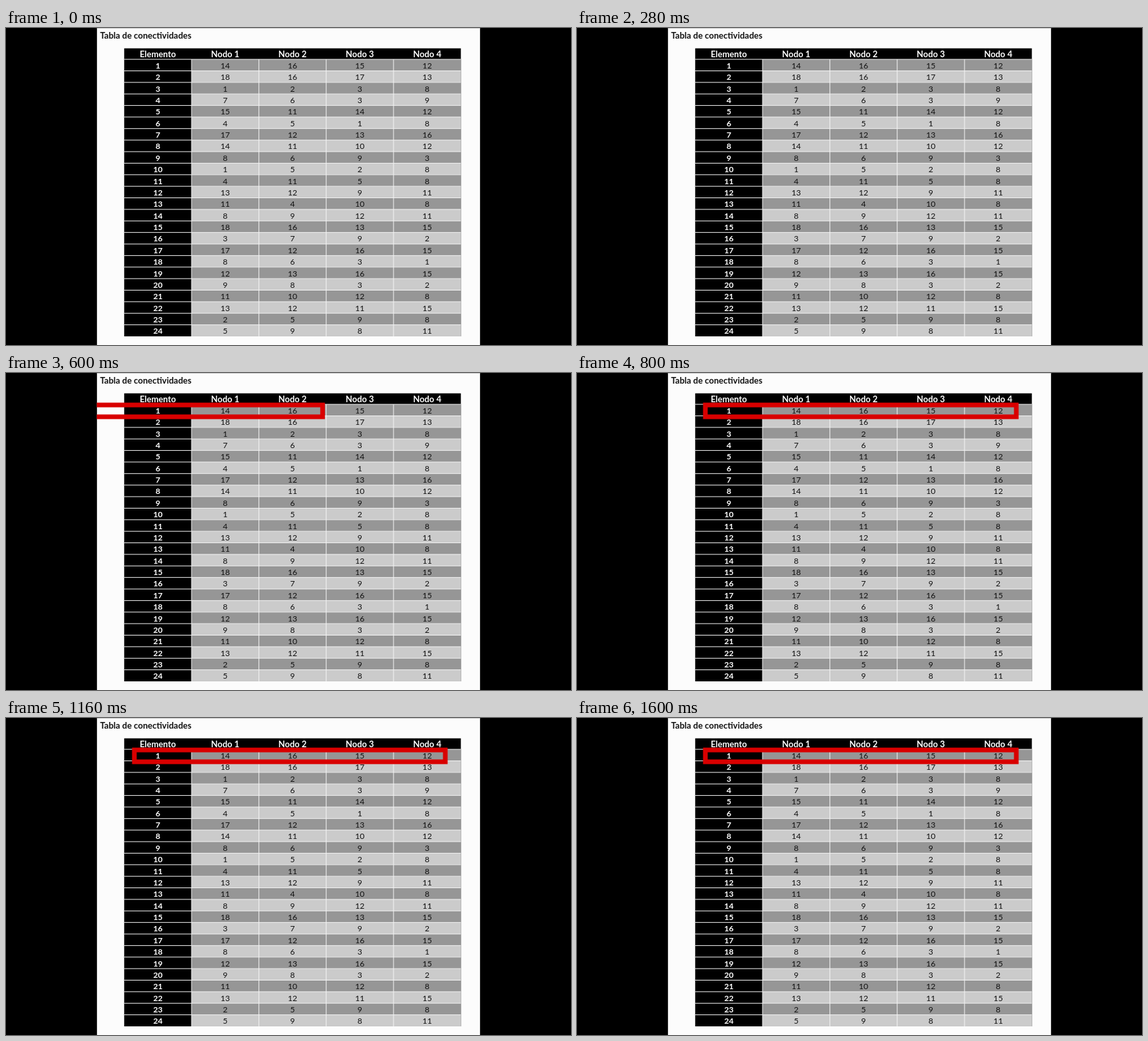
Animation, 850 px wide and 477 px high, one loop 1640 ms. Source, as an HTML page with a canvas:

```html
<!DOCTYPE html>
<html lang="es">
<head>
<meta charset="utf-8">
<title>Tabla de conectividades</title>
<style>
  html, body { margin: 0; width: 100%; height: 100%; overflow: hidden; background: #000; }
  canvas { display: block; width: 850px; height: 477px; }
</style>
</head>
<body>
<canvas id="stage" width="850" height="477"></canvas>
<script>
const ctx = document.getElementById('stage').getContext('2d');
const LOOP = 1640, STEP = 40;
const PAGE = { left: 136.6, width: 576.8 };
const TABLE = { left: 177.8, top: 30.6, body: 47.1, rowHeight: 17.37, colWidth: 101.3 };
const MARK = { left: 189.6, top: 44.6, width: 474.8, height: 24.8, line: 7, arrival: 760, speed: 1.154 };
const LINE_COLOR = '#f4f4f4';

// The table's visible text: the four nodes of each element.
const rows = `
14 16 15 12 | 18 16 17 13 | 1 2 3 8    | 7 6 3 9
15 11 14 12 | 4 5 1 8     | 17 12 13 16 | 14 11 10 12
8 6 9 3     | 1 5 2 8     | 4 11 5 8   | 13 12 9 11
11 4 10 8   | 8 9 12 11   | 18 16 13 15 | 3 7 9 2
17 12 16 15 | 8 6 3 1     | 12 13 16 15 | 9 8 3 2
11 10 12 8  | 13 12 11 15 | 2 5 9 8    | 5 9 8 11
`.trim().split(/[|\n]/).map(row => row.trim().split(' '));
const headers = ['Elemento', 'Nodo 1', 'Nodo 2', 'Nodo 3', 'Nodo 4'];

const rowTop = i => TABLE.body + i * TABLE.rowHeight;
const colLeft = i => TABLE.left + i * TABLE.colWidth;
const colCenter = i => colLeft(i + 0.5);

function fill(color, x, y, w, h) {
  ctx.fillStyle = color;
  ctx.fillRect(x, y, w, h);
}

function label(text, x, y, color, size, weight = 400, align = 'center') {
  ctx.font = `${weight} ${size}px Lato, "Open Sans", sans-serif`;
  ctx.textAlign = align;
  ctx.fillStyle = color;
  ctx.fillText(text, x, y);
}

function drawTable() {
  const width = headers.length * TABLE.colWidth;
  const height = rows.length * TABLE.rowHeight;
  fill('#000', TABLE.left, TABLE.top, width, TABLE.body + height - TABLE.top);

  rows.forEach((row, i) => {
    fill(i % 2 ? '#cbcbcb' : '#969696', colLeft(1), rowTop(i), width - TABLE.colWidth, TABLE.rowHeight);
  });
  rows.forEach((row, i) => fill(LINE_COLOR, TABLE.left, rowTop(i) - 0.5, width, 1));
  for (let c = 1; c < headers.length; c++) {
    fill(LINE_COLOR, colLeft(c) - 0.5, TABLE.body, 1, height);
  }

  headers.forEach((text, c) => label(text, colCenter(c), 44, '#fff', 12.9, 700));
  rows.forEach((row, i) => {
    const baseline = rowTop(i) + 13.8;
    label(i + 1, colCenter(0), baseline, '#fff', 12.2, 700);
    row.forEach((node, c) => label(node, colCenter(c + 1), baseline, '#111', 12.2));
  });
}

// The frame flies in from the page's left edge at constant speed.
function drawMark(time) {
  const { left, top, width, height, line } = MARK;
  const shift = Math.min(0, (time - MARK.arrival) * MARK.speed);
  ctx.strokeStyle = '#d90000';
  ctx.lineWidth = line;
  ctx.strokeRect(left + shift + line / 2, top + line / 2, width - line, height - line);
}

function draw(now) {
  const time = Math.floor((now % LOOP) / STEP) * STEP;
  fill('#000', 0, 0, 850, 477);
  ctx.save();
  ctx.beginPath();
  ctx.rect(PAGE.left, 0, PAGE.width, 477);
  ctx.clip();
  fill('#fcfcfc', PAGE.left, 0, PAGE.width, 477);
  fill('#c8c8c8', PAGE.left, 0, PAGE.width, 1);
  label('Tabla de conectividades', 141.5, 16, '#111', 13, 700, 'left');
  drawTable();
  drawMark(time);
  ctx.restore();
}

const start = performance.now();
function tick() {
  draw(performance.now() - start);
  requestAnimationFrame(tick);
}
tick();
</script>
</body>
</html>
```
